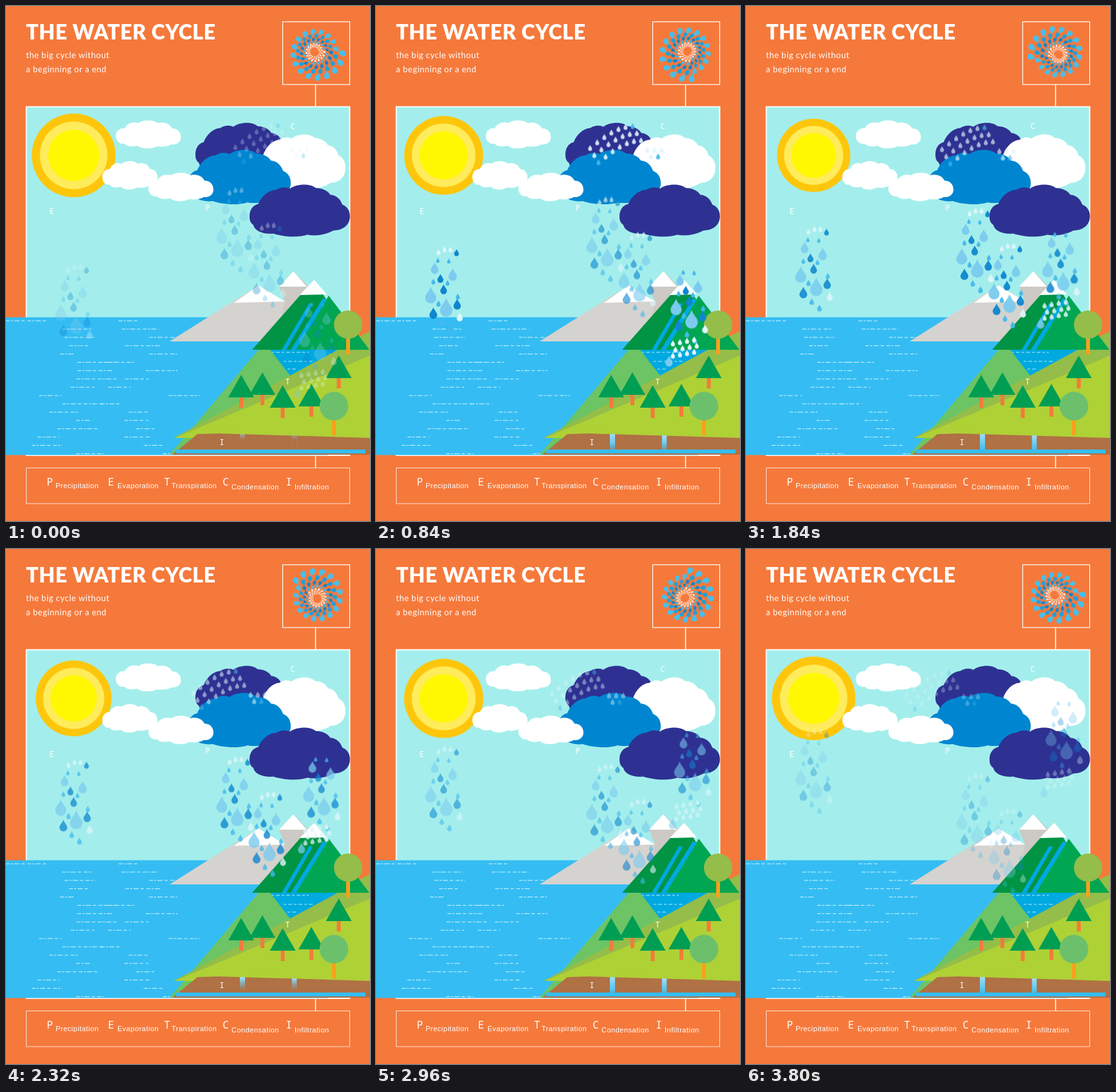
An HTML page that plays this animation: 565 px wide and 800 px high, repeating every 3840 ms.

```html
<!DOCTYPE html>
<html lang="en">
<head>
<meta charset="utf-8">
<title>The Water Cycle</title>
<style>
html, body { margin: 0; width: 100%; height: 100%; overflow: hidden; background: #f5793b; }
svg { display: block; width: 565px; height: 800px; }
text { fill: #fff; }
.title { font: 900 32px Lato, sans-serif; letter-spacing: .55px; }
.sub { font: 400 13px Lato, sans-serif; letter-spacing: .5px; }
.mark { font: 12px "Noto Sans Mono", monospace; text-anchor: middle; }
.key { font: 16px "Noto Sans Mono", monospace; text-anchor: middle; }
.word { font: 11px "Liberation Sans", Arial, sans-serif; letter-spacing: .5px; }

.sun, .emblem, .rise, .fall, .steam, .drift, .cover { animation: 3.84s linear infinite; }
.sun { transform-origin: 105px 232px; animation-name: pulse; }
.emblem { transform-origin: 482px 73.5px; animation-name: spin; }
.rise { animation-name: rise, fadeUp; }
.fall { animation-name: fall, fadeDown; }
.steam { animation-name: steam, fadeUp; }
.drift { animation-name: drift, fadeSide; }
.cover { animation-name: soak; animation-duration: 1.92s; }

@keyframes pulse { 47% { transform: scale(.873); } }
@keyframes spin { to { transform: rotate(360deg); } }
@keyframes rise { from { transform: translateY(59px); } to { transform: translateY(-64px); } }
@keyframes fall { from { transform: translateY(-32px); } to { transform: translateY(35px); } }
@keyframes steam { from { transform: translate(-3.4px, 75px); } to { transform: translate(6.6px, -151px); } }
@keyframes drift { from { transform: translate(36px, -2px); } to { transform: translate(-72px, 5px); } }
@keyframes fadeUp { 0%, 100% { opacity: .33; } 10%, 35% { opacity: 1; } }
@keyframes fadeDown { 0%, 100% { opacity: .33; } 48% { opacity: .95; } }
@keyframes fadeSide { 0%, 100% { opacity: .27; } 10% { opacity: 1; } 60% { opacity: .55; } }
@keyframes soak { from { transform: none; } 67%, to { transform: translateY(36px); } }
</style>
</head>
<body>
<svg viewBox="0 0 565 800">
  <defs>
    <path id="drop" d="M0-2C.3-1.1 1-.7 1 0A1 1 0 0 1-1 0C-1-.7-.3-1.1 0-2Z"/>
    <path id="puff" d="M0 25C0 17 7 12 14 13C17 5 28 2 35 5C41 0 58-1 65 5C74 2 84 6 87 13C95 13 101 18 101 27C101 35 93 39 86 38C80 42 70 42 64 41C55 46 38 45 34 40C26 42 16 41 14 37C6 38 0 33 0 25Z"/>
    <path id="cloud" d="M0 52C0 42 5 34 14 32C18 22 28 10 42 9C50 4 58 4 64 7C74-1 96-2 105 6C114 6 124 10 128 17C139 18 144 25 147 33C156 37 159 44 159 52C159 66 148 75 133 75C116 84 100 84 92 82C75 88 48 84 38 80C22 82 8 76 6 66C1 62 0 58 0 52Z"/>
    <linearGradient id="water" x2="0" y2="1">
      <stop stop-color="#9fdcf5"/><stop offset="1" stop-color="#3bbdf0"/>
    </linearGradient>
    <linearGradient id="soil" x2="0" y2="1">
      <stop stop-color="#b07144" stop-opacity="0"/><stop offset=".45" stop-color="#b07144"/>
    </linearGradient>
    <clipPath id="pipes"><path d="M363 665h8v25h-8zM443.500 667h8v23h-8z"/></clipPath>
  </defs>

  <rect width="565" height="800" fill="#f5793b"/>
  <text class="title" x="31" y="52">THE WATER CYCLE</text>
  <text class="sub" x="31" y="81">the big cycle without</text>
  <text class="sub" x="31" y="103">a beginning or a end</text>

  <g fill="none" stroke="#fff">
    <rect x="429.500" y="24.500" width="104" height="97.500" stroke-width="1.200"/>
    <path d="M480.500 122V157M480.500 697V718" stroke-width="1.500"/>
    <rect x="31.500" y="717.500" width="502" height="55.500" stroke="#fde0d0"/>
    <rect x="31.500" y="156.500" width="502" height="541.500" fill="#a3eeec" stroke-width="1.800"/>
  </g>
  <g class="emblem" id="emblem"></g>

  <g class="sun">
    <circle cx="105" cy="232" r="65" fill="#fec60b"/>
    <circle cx="105" cy="232" r="52.500" fill="#ffec5c"/>
    <circle cx="105" cy="232" r="39.700" fill="#fff800"/>
  </g>
  <g fill="#fff">
    <use href="#cloud" fill="#2e3192" transform="translate(294 181) scale(.92 .95)"/>
    <use href="#cloud" transform="translate(387 199) scale(.88 1.010)"/>
    <use href="#cloud" fill="#0086d1" transform="translate(283 223)"/>
    <use href="#cloud" fill="#2e3192" transform="translate(378 277) scale(.98 .955)"/>
    <use href="#puff" transform="translate(170.500 177)"/>
    <use href="#puff" transform="translate(149.500 240) scale(.85 1.020)"/>
    <use href="#puff" transform="translate(221 258) scale(1 1.020)"/>
  </g>

  <rect y="483.500" width="500" height="214" fill="#35bdf3"/>
  <path id="waves" fill="none" stroke="#e9fbff" stroke-width=".9" stroke-dasharray="6 2 3 2 8 3 5 4"/>

  <path d="M254 521L392 434L433 459L446 470V521Z" fill="#d5d3cf"/>
  <path d="M433 459L424 436L446 412L480 446L420 521Z" fill="#cdc9c5"/>
  <path d="M354 461L392 434L433 459ZM424 436L446 412L467 436Z" fill="#fff"/>
  <path d="M535 520L565 505V545H535Z" fill="#94bd49"/>
  <path d="M382 534L478 425L545 534Z" fill="#009444"/>
  <path d="M456 449L478 425L498 448Z" fill="#fff"/>
  <path d="M447 534L501 450L564 534Z" fill="#00a651"/>
  <path d="M471 461L476 463L435 534H428ZM492 454L498 456L450 534H442Z" fill="#00a9e0"/>

  <path d="M405 534H516L440 575Z" fill="#00a9e0"/>
  <path d="M412 538H470M431 552H476M437 564H452" stroke="#e9fbff" stroke-width=".8" stroke-dasharray="4 3 6 3"/>
  <path d="M254 697L392 534H410L441 574L330 697Z" fill="#6cc465"/>
  <path d="M260 671L441 574L515 534H565V671Z" fill="#94bd49"/>
  <path d="M262 671L565 543V672Z" fill="#aed136"/>
  <path d="M258 697L297 665L330 664L565 671V697Z" fill="#b07144"/>
  <g clip-path="url(#pipes)">
    <rect x="363" y="665" width="8" height="25" fill="url(#water)"/>
    <rect x="443.500" y="667" width="8" height="23" fill="url(#water)"/>
    <rect class="cover" x="360" y="656" width="95" height="40" fill="url(#soil)"/>
  </g>
  <rect x="264" y="689" width="294" height="6" fill="#35bdf3"/>

  <g id="trees"></g>
  <g fill="#f9a01b">
    <path d="M528 515h6v26h-6zM506 642h6v25h-6z"/>
    <circle cx="531" cy="495" r="22" fill="#94bd49"/>
    <circle cx="509" cy="621.500" r="22.300" fill="#6cc06c"/>
  </g>

  <g class="rise"><g id="shower"><g id="crown"></g><g id="body"></g></g></g>
  <g class="fall">
    <use href="#shower" x="250" y="-28.500"/>
    <use href="#shower" x="300" y="26"/>
  </g>
  <g class="steam"><use href="#body" x="382" y="25"/><g id="spray"></g></g>
  <g class="drift" id="mist"></g>
  <g id="labels"></g>
</svg>
<script>
const $ = id => document.getElementById(id);
const WHITE = '#e0f5fb', LIGHT = '#7bcbef', MID = '#45b9ec', DARK = '#0f86cf';
const repeat = (n, fn) => Array.from({ length: n }, (_, i) => fn(i)).join('');
const drop = (x, y, r, fill, turn = 0) =>
  `<use href="#drop" fill="${fill}" transform="translate(${x} ${y}) rotate(${turn}) scale(${r})"/>`;

// Drops of one tint; they grow with the distance down the shower.
const drops = (fill, size, growth, points) =>
  points.map(([x, y]) => {
    const r = size + growth * (y - 350);
    return drop(x, y + r / 2, r, fill);
  }).join('');

$('crown').innerHTML =
  repeat(3, i => drop(97 + 9.3 * i, 352 - 5 * Math.sin(i * Math.PI / 3), 3.1, WHITE)) +
  drops(DARK, 3.7, 0, [[125, 351]]);
$('body').innerHTML =
  drops(LIGHT, 4.4, .062, [[91, 375], [119, 385], [85, 417], [109, 436]]) +
  drops(DARK, 3.7, .025, [[100, 391], [105, 408], [126, 431], [89, 445]]) +
  drops(MID, 2.6, .009, [[96, 363], [113, 364], [89, 396], [111, 398], [127, 419], [97, 430], [102, 459], [114, 469]]) +
  drops(WHITE, 4.6, 0, [[130, 451]]);

$('spray').innerHTML = repeat(12, i => {
  const row = Math.floor(i / 4), col = i % 4;
  return drop(462 + 11 * col + 4 * (row % 2), 500 + 9.5 * row - 2 * col, 3.2, WHITE);
}) + drop(456, 529, 5.6, LIGHT);

// Three curved rows, then a short tail.
$('mist').innerHTML = repeat(21, i => {
  const row = Math.floor(i / 7), col = i % 7;
  return drop(320 + 11 * col + 6.5 * row, 222.5 - 34 * Math.sin(col / 6 * Math.PI / 2) + 11 * row,
    3.1, (i + 2) % 8 ? WHITE : MID);
}) + repeat(5, i => drop(409 + 5.5 * i, 225.5 + 10 * (i % 2), 3.2, i === 3 ? MID : WHITE));

// One shrinking spiral whose eye sits off the centre.
const bands = ['#45c0ee', '#1f9fdb', '#0f84cb', '#45b8e8'];
$('emblem').innerHTML = repeat(116, i => {
  const turn = i / 16.5, shrink = .775 ** turn, a = 2 * Math.PI * turn;
  const x = 482 - 3.8 * (1 - shrink) + 41 * shrink * Math.cos(a);
  const y = 73.5 - 3.3 * (1 - shrink) + 41 * shrink * Math.sin(a);
  return drop(x, y, 4.5 * shrink, bands[Math.floor(turn)] || '#fdeee5', a * 180 / Math.PI - 65);
});

let seed = 7;
const random = () => (seed = seed * 16807 % 2147483647) / 2147483647;
$('waves').setAttribute('d', repeat(34, i => {
  const x = (i % 2) * 140 + random() * 120;
  return `M${x} ${489 + Math.floor(i / 2) * 12.9}h${20 + random() * 50}`;
}));

$('trees').innerHTML = [[365, 573], [398, 569], [429.5, 589], [474, 587], [516.5, 543]].map(([x, y]) =>
  `<path d="M${x - 3} ${y + 34}h6v17h-6z" fill="#f5793b"/>` +
  `<path d="M${x} ${y}l20 35h-40z" fill="#009e52"/>`).join('');

const text = (cls, x, y, s) => `<text class="${cls}" x="${x}" y="${y}">${s}</text>`;
const stages = [
  { word: 'Precipitation', key: 68, x: 77, mark: [313, 318] },
  { word: 'Evaporation', key: 163, x: 173, mark: [71, 323] },
  { word: 'Transpiration', key: 250, x: 257, mark: [437, 588] },
  { word: 'Condensation', key: 341, x: 350, mark: [445, 191] },
  { word: 'Infiltration', key: 439, x: 448, mark: [335, 682] }
];
$('labels').innerHTML = stages.map(({ word, key, x, mark }, i) =>
  text('mark', ...mark, word[0]) + text('key', key, 745, word[0]) +
  text('word', x, i < 3 ? 749 : 751, word)).join('');
</script>
</body>
</html>
```
